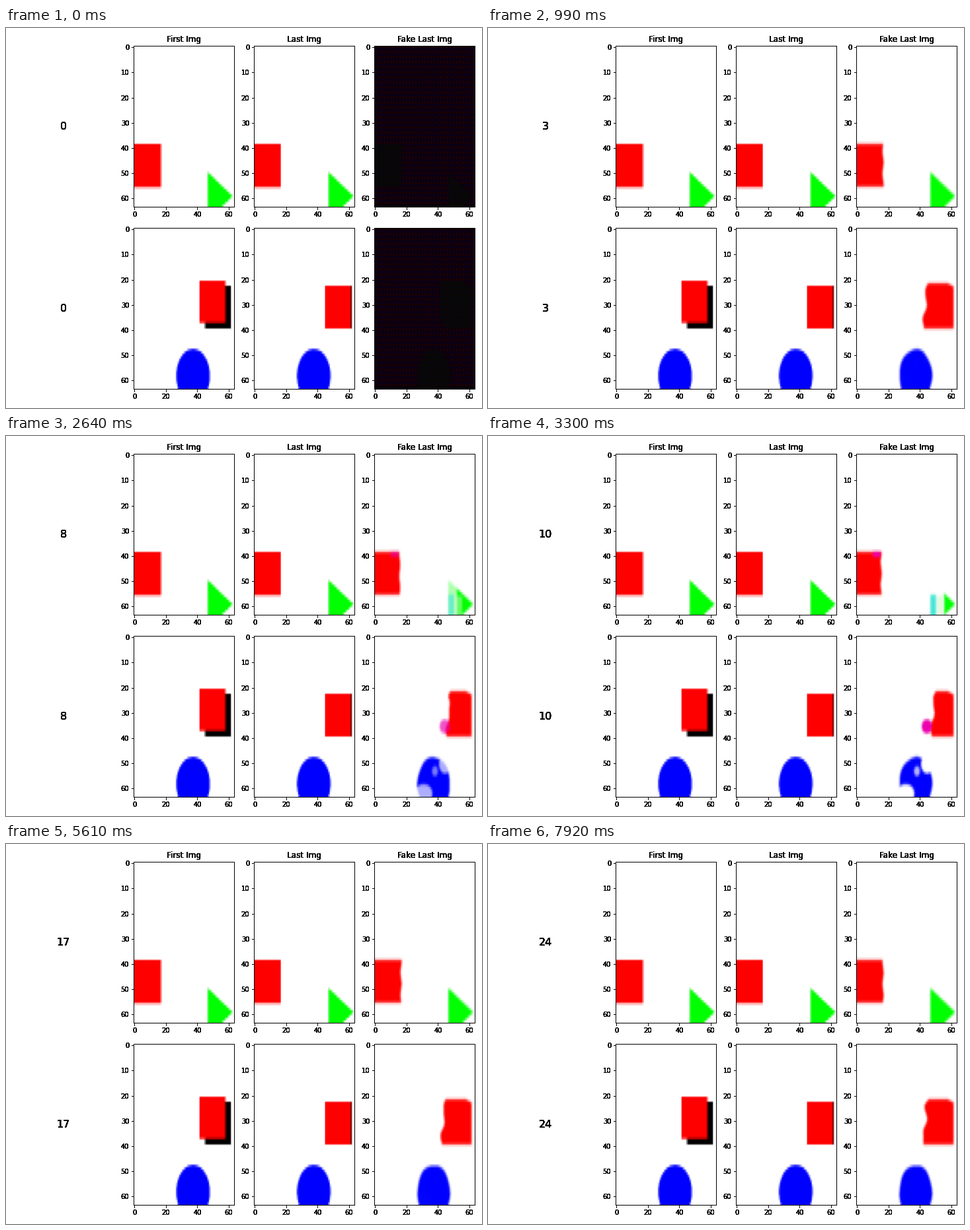
A matplotlib script that plays this animation: 720 by 576 pixels, repeating every 8 s.

```python
import numpy as np
import matplotlib.pyplot as plt
from matplotlib.animation import FuncAnimation
from matplotlib.path import Path

W, H, N, SUB = 720, 576, 64, 4
LOOP, STEP, HOLD, LAST = 8000, 20, 330, 24
BOLD = 8  # labels are drawn over themselves this many times
LEFTS = [193.3 + 182 * k for k in range(3)]
TOPS = [27.4 + 276 * k for k in range(2)]
PW, PH = 152, 244
TITLES = ("First Img", "Last Img", "Fake Last Img")

RED, GREEN, BLUE = (255, 0, 0), (0, 255, 0), (0, 0, 255)
BLACK, WHITE = (0, 0, 0), (255, 255, 255)
MAGENTA, CYAN, PALE = (235, 0, 175), (70, 230, 215), (215, 248, 210)

fig = plt.figure(figsize=(W / 72, H / 72), dpi=72, facecolor="white")

# ---------- shapes on the 64 x 64 grid ----------
side = (np.arange(N * SUB) + 0.5) / SUB
GRID = np.stack(np.meshgrid(side, side), -1).reshape(-1, 2)


def blur(m, n):
    for axis in (0, 1):
        pad = [(0, 0), (0, 0)]
        pad[axis] = (n, n)
        p = np.pad(m, pad, mode="edge")
        size = m.shape[axis]
        m = sum(np.take(p, range(k, k + size), axis) for k in range(2 * n + 1)) / (2 * n + 1)
    return m


def cover(pts, soft):
    """Share of every cell that lies inside the polygon."""
    pts = np.asarray(pts, float)
    path = Path(np.vstack([pts, pts[:1]]), closed=True)
    m = path.contains_points(GRID).reshape(N * SUB, N * SUB).astype(float)
    return blur(m, soft).reshape(N, SUB, N, SUB).mean((1, 3))


def box(x0, y0, x1, y1):
    return [(x0, y0), (x1, y0), (x1, y1), (x0, y1)]


def oval(cx, cy, rx, ry, wave=0, phase=0):
    a = np.linspace(0, 2 * np.pi, 60, endpoint=False)
    k = 1 - wave * (1 + np.sin(5 * a + phase))
    return np.column_stack([cx + rx * k * np.cos(a), cy + ry * k * np.sin(a)])


def picture(*layers, soft=0):
    img = np.full((N, N, 3), 255.0)
    for pts, color, alpha in layers:
        m = cover(pts, soft)[..., None] * alpha
        img = img * (1 - m) + np.array(color) * m
    return np.clip(img + 0.5, 0, 255).astype(np.uint8)


TRIANGLE = [(47.2, 50.2), (63.1, 59.8), (47.2, 69.4)]
SHADOW = box(45.4, 23, 61.9, 39.9)
first = [
    picture((box(-2, 39, 17.5, 56.3), RED, 1), (TRIANGLE, GREEN, 1)),
    picture((SHADOW, BLACK, 1), (box(42, 21, 58.5, 37.8), RED, 1),
            (oval(37.9, 58.8, 10.7, 10.7), BLUE, 1)),
]
last = [
    picture((box(-2, 39, 16.9, 56.3), RED, 1), (TRIANGLE, GREEN, 1)),
    picture((SHADOW, BLACK, 1), (box(45, 23, 61.5, 39.9), RED, 1),
            (oval(37.9, 58.8, 10.6, 10.7), BLUE, 1)),
]


# ---------- generated pictures ----------
def untrained(row):
    """Near-black output with a fine red and blue weave."""
    r, c = np.mgrid[:N, :N]
    img = np.zeros((N, N, 3))
    img[..., 0] = 9 + 26 * ((c % 2 == 0) & (r % 2 == 0))
    img[..., 2] = 6 + 32 * ((c % 2 == 1) & (r % 2 == 1))
    img[-1] *= 0.4
    shape = 1 - np.minimum(first[row], last[row]).min(-1) / 255
    img += shape[..., None] * (np.array([6, 9, 6]) - img) * 0.7
    return img.astype(np.uint8)


def generated(epoch):
    if epoch == 0:
        return untrained(0), untrained(1)
    ruin = np.exp(-((epoch - 10) / 3.2) ** 2)  # training collapses, then recovers
    p = np.random.default_rng(epoch).uniform(0, 2 * np.pi, 3)

    y = np.linspace(39, 56.1, 14)
    x = 17.1 - 1.2 * ruin + 0.35 * np.sin(0.7 * y + p[0])
    block = [(-4, 39), *zip(x, y), (-4, 56.1)]

    y = np.linspace(39.9, 22.1, 16)
    x = 43.6 + 5 * ruin + 1.2 * np.cos(0.35 * (y - 29)) + 0.5 * np.sin(0.8 * y + p[1])
    x += 1.5 * np.clip(24 - y, 0, 2)
    square = [*zip(x, y), (58.5, 22.1), (62.1, 23.3), (62.1, 39.9)]

    upper = picture(
        (block, RED, 1),
        (box(10.5, 39, 15.5, 41), MAGENTA, ruin),
        (TRIANGLE, GREEN, 1),
        (box(46, 49, 46 + 10 * ruin, 65), WHITE, ruin),
        (box(51, 56.5, 56, 65), PALE, 0.7 * ruin),
        (box(47.2, 56, 50.8, 65), CYAN, ruin),
        soft=2)
    lower = picture(
        (square, RED, 1),
        (oval(45, 36, 3.3, 2.8), MAGENTA, ruin),
        (oval(37.9, 58.8, 10.6, 10.8, 0.02, p[2]), BLUE, 1),
        (oval(45.2, 51, 3.9, 3.7), WHITE, ruin),
        (oval(31.5, 62.6, 5.5, 3.7), WHITE, ruin),
        (oval(38.7, 53.8, 1.9, 2), WHITE, 0.7 * ruin),
        soft=2)
    return upper, lower


fakes = [generated(e) for e in range(LAST + 1)]


# ---------- stage ----------
def panel(left, top):
    return fig.add_axes([left / W, (H - top - PH) / H, PW / W, PH / H])


def show(left, top, img):
    ax = panel(left, top)
    im = ax.imshow(img, aspect="auto", interpolation="hanning")
    ax.axis("off")
    return im


def snap():
    fig.canvas.draw()
    pic = np.array(fig.canvas.buffer_rgba())
    fig.clear()
    return pic


# frames, ticks and titles as one dark overlay
for row, top in enumerate(TOPS):
    for left, title in zip(LEFTS, TITLES):
        ax = panel(left, top)
        ax.set(xlim=(-0.5, N - 0.5), ylim=(N - 0.5, -0.5),
               xticks=range(0, 61, 20), yticks=range(0, 61, 10))
        if row == 0:
            ax.set_title(title, fontsize=12)
light = snap()[..., 0] / 255
overlay = np.zeros((H, W, 4), np.uint8)
overlay[..., 3] = np.round(255 * (1 - light ** BOLD))

# the two fixed columns as one backdrop
for row, top in enumerate(TOPS):
    show(LEFTS[0], top, first[row])
    show(LEFTS[1], top, last[row])
backdrop = snap()

fig.figimage(backdrop, zorder=-1)
fig.figimage(overlay, zorder=5)
outputs = [show(LEFTS[2], top, fakes[0][row]) for row, top in enumerate(TOPS)]
counters = [
    fig.text(86.7 / W, 1 - (top + PH / 2) / H, "0", fontsize=16, ha="center", va="center")
    for top in TOPS for _ in range(BOLD)
]


def update(i):
    epoch = min((i * STEP + STEP // 2) // HOLD, LAST)
    for im, img in zip(outputs, fakes[epoch]):
        im.set_data(img)
    for label in counters:
        label.set_text(str(epoch))
    return outputs + counters


anim = FuncAnimation(fig, update, frames=LOOP // STEP, interval=STEP,
                     repeat=True, repeat_delay=0, blit=False)
plt.show()
```
